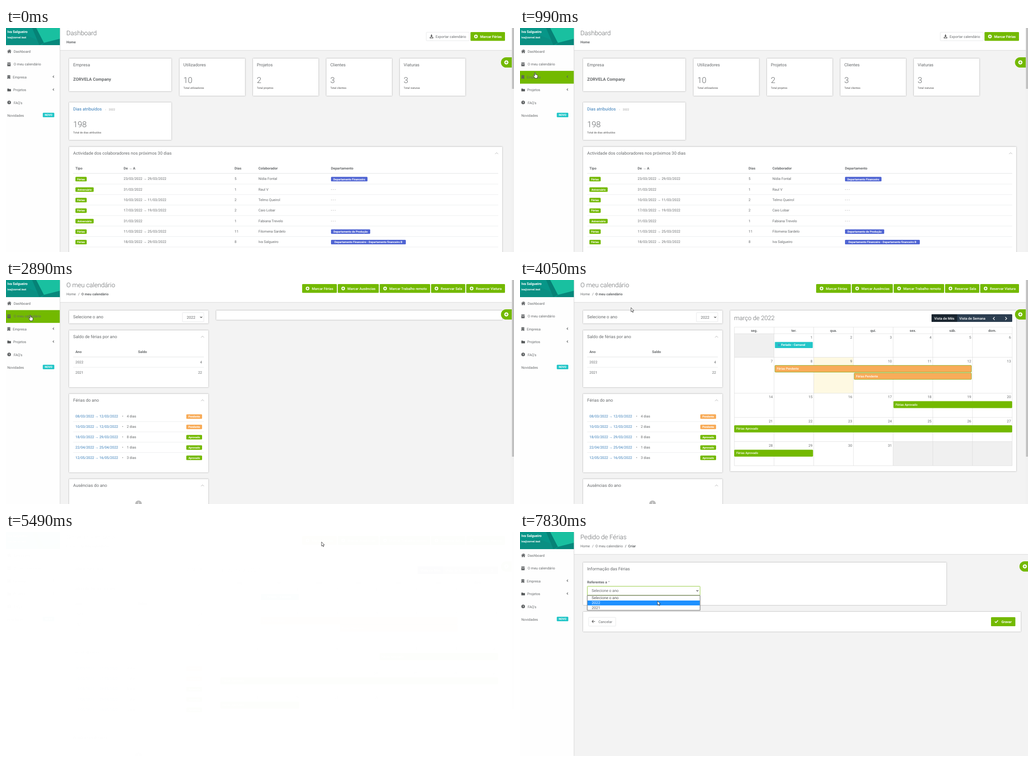
Write an HTML page that moves like this. It is 1127x497 px and loops after 8 s.

```html
<!DOCTYPE html>
<html lang="pt">
<head>
<meta charset="utf-8">
<title>Calendário</title>
<style>
html, body { margin: 0; width: 100%; height: 100%; overflow: hidden; background: #f3f3f3; }
svg { display: block; width: 100vw; height: 100vh; }
text { font-family: Roboto, Arial, sans-serif; text-rendering: geometricPrecision; white-space: pre; }
.card { filter: drop-shadow(0 .9px .8px rgba(0,0,0,.42)); }
.bar { filter: drop-shadow(0 .5px 1px rgba(0,0,0,.25)); }
</style>
</head>
<body>
<svg id="stage" viewBox="0 0 1127 497" preserveAspectRatio="none"></svg>
<script>
const GREEN = '#73b900', GREY = '#676a6c', BLUE = '#337ab7', CYAN = '#23c6c8',
      ORANGE = '#f8ac59', INDIGO = '#5065d3', LINE = '#e4e5e7';
const USER = 'Iva Salgueiro';

// Markup helpers
const rect = (x, y, w, h, fill, more = '') =>
  `<rect x="${x}" y="${y}" width="${w}" height="${h}" fill="${fill}" ${more}/>`;
const text = (x, y, s, size = 7.8, fill = GREY, weight = 400, anchor = 'start') =>
  `<text x="${x}" y="${y}" font-size="${size}" fill="${fill}" font-weight="${weight}" text-anchor="${anchor}">${s}</text>`;
const bold = (x, y, s, size = 7.75) => text(x, y, s, size, GREY, 700);
const path = (d, fill, more = '') => `<path d="${d}" fill="${fill}" ${more}/>`;
const stroke = (d, color, width = 1) => path(d, 'none', `stroke="${color}" stroke-width="${width}"`);
const group = (id, body, more = '') => `<g id="${id}" ${more}>${body}</g>`;
const card = (x, y, w, h) => rect(x, y, w, h, '#fff', 'class="card"');
const rule = (x1, x2, y, color = LINE) => stroke(`M${x1} ${y}H${x2}`, color, .7);
const title = (x, y, s, fill = GREY) => text(x, y, s, 9.5, fill);
const fold = (x, y) => stroke(`M${x - 3.2} ${y + 1.6}l3.2 -3.2l3.2 3.2`, '#b0b0b0', 1);
const drop = (x, y) => stroke(`M${x - 2.2} ${y - 1.1}l2.2 2.3l2.2 -2.3`, '#444', 1.2);
const badge = (x, y, w, s, fill, size = 6.2) =>
  rect(x, y - 5, w, 10, fill, 'rx="1.6"') + text(x + w / 2, y + 2.2, s, size, '#fff', 700, 'middle');
const plus = (x, y, color, r = 4) =>
  `<circle cx="${x}" cy="${y}" r="${r}" fill="#fff"/>` +
  stroke(`M${x - r * .55} ${y}h${r * 1.1}M${x} ${y - r * .55}v${r * 1.1}`, color, 1.3);
const button = (x, w, s, weight = 500, id = '') =>
  rect(x, 9, w, 19.4, GREEN, `rx="1.5" ${id}`) + plus(x + 12, 18.8, GREEN) +
  text(x + 21.6, 21.6, s, 7.7, '#fff', weight);
const outline = (x, y, w, h, id = '') =>
  rect(x + .4, y + .4, w, h, '#fff', `stroke="#e1e3e5" stroke-width=".8" rx="1" ${id}`);
const tab = x => path(`M1127 65H${x + 11.5}a11.4 11.4 0 0 0 0 22.8H${Math.min(1127, x + 24)}V65z`, GREEN) +
  plus(x + 12, 76.3, GREEN, 4.6);
const plusTab = x => `<svg x="0" y="0" width="${x + 24}" height="497">${tab(x)}</svg>`;
const scrollbar = h => rect(1122, 0, 5, 497, '#f1f1f1') + rect(1122.5, 0, 4.5, h, '#c1c1c1');
const header = (w, name) => rect(119.5, 0, w, 49, '#fff', 'class="bar"') + text(134, 16, name, 14.1, GREY, 300);

// Sidebar
const ITEM_Y = i => 38.4 + 28.35 * i;
function sidebar() {
  const ink = '#585b5d';
  const items = [[17, 'Dashboard'], [17, 'O meu calendário'], [15, 'Empresa'], [16, 'Projetos'], [17, "FAQ's"], [3, 'Novidades']];
  return rect(0, 0, 119.3, 497, '#fefefe', 'class="bar"') +
    rect(0, 0, 119.3, 38, '#079688') +
    path('M0 28L40 14L84 33L74 38H0z', '#0a8f82') +
    path('M67 0L84 33L119.3 24V0z', '#19c0a0') +
    path('M84 33L119.3 24V38H80z', '#07877b') +
    path('M67 0L84 33L74 38L58 0z', '#068276') +
    text(3, 11, USER, 7.7, '#fff', 700) + text(3, 23, 'iva@zorvel.test', 6, '#fff', 700) +
    rect(0, 0, 119.3, 28.4, GREEN, 'id="hover" opacity="0"') +
    items.map(([x, s], i) => text(x, 55 + 28.4 * i, s)).join('') +
    path('M7.2 47.6L2.6 51.6l.7 .7l3.9 -3.4l3.9 3.4l.7 -.7l-1.5 -1.3v-2h-1.2v1zM4 52.2v3.6h2.4v-2.5h1.6v2.5h2.4v-3.6l-3.2 -2.8z', ink) +
    path('M3 78.2h7.2v-1.5h-1.3v-1h-1v1h-2.6v-1h-1v1h-1.3zM3 79h7.2v5.7h-7.2zM4.4 80.6h4.4v.9h-4.4z', ink, 'fill-rule="evenodd"') +
    path('M3.2 104.7h6.2v8h-2.3v-1.8h-1.6v1.8h-2.3zM4.5 106h1v1h-1zM7.1 106h1v1h-1zM4.5 108.2h1v1h-1zM7.1 108.2h1v1h-1z', ink, 'fill-rule="evenodd"') +
    path('M3 134.4h3l1 1h4v5h-8z', ink) +
    `<circle cx="7" cy="165.2" r="3.9" fill="${ink}"/>` + text(7, 167.5, '?', 6.4, '#fff', 700, 'middle') +
    [108, 136.6].map(y => stroke(`M106.4 ${y - 2.3}l-2.3 2.3l2.3 2.3`, ink, 1.1)).join('') +
    badge(81.6, 193, 25.6, 'NOVO', CYAN);
}

// Dashboard page
const ROW_Y = i => 323 + 23.28 * i;
function dashboard() {
  const counts = [['Utilizadores', 10], ['Projetos', 2], ['Clientes', 3], ['Viaturas', 3]];
  const rows = [
    ['23/03/2022 → 29/03/2022', 5, 'Nídia Fontal', 'Departamento Financeiro', 81],
    ['31/03/2022', 1, 'Raul V'],
    ['10/03/2022 → 11/03/2022', 2, 'Telmo Queirol'],
    ['17/03/2022 → 19/03/2022', 2, 'Caio Lobar'],
    ['31/03/2022', 1, 'Fabiana Trevelo'],
    ['11/03/2022 → 25/03/2022', 11, 'Filomena Sardelo', 'Departamento de Produção', 87],
    ['18/03/2022 → 29/03/2022', 8, USER, 'Departamento Financeiro - Departamento financeiro B', 166]];
  let s = header(1003, 'Dashboard') + bold(134, 34, 'Home') +
    outline(932, 9, 95.5, 18.8) + text(953, 21.6, 'Exportar calendário') +
    path('M943 14.5h2v3h2l-3 3l-3 -3h2zM940 20.5h2l2 1.6l2 -1.6h2v2.3h-8z', '#555') +
    button(1030.5, 76.5, 'Marcar Férias', 700) +
    card(140, 67.5, 227, 73) + title(149, 85, 'Empresa') + bold(149, 117.4, 'ZORVELA Company', 9.5);
  counts.forEach(([name, n], i) => {
    const x = 385 + 162.9 * i;
    s += card(x, 67.5, 145.5, 83) + title(x + 8.6, 85, name) + text(x + 8.6, 122.4, n, 18, GREY, 300) +
      text(x + 8.6, 135.2, 'Total ' + name.toLowerCase(), 6, '#555');
  });
  s += card(140, 165, 227, 83.5) + title(149, 183, 'Dias atribuídos', BLUE) + text(220, 183, '-', 6) +
    text(228, 183, '2022', 6.2, '#999') + text(149, 220.4, '198', 18, GREY, 300) +
    text(149, 233.8, 'Total de dias atribuídos', 6, '#555') +
    card(140, 263.5, 961, 260) + title(149, 281.3, 'Actividade dos colaboradores nos próximos 30 dias') + fold(1088.5, 278) +
    rect(149, 0, 943, 23, '#f5f5f5', 'id="row" opacity="0"');
  [[154, 'Tipo'], [261, 'De → A'], [507, 'Dias'], [560, 'Colaborador'], [721, 'Departamento']]
    .forEach(([x, h]) => s += bold(x, 314.3, h));
  s += rule(149, 1092, 322.6, '#d5d7d9');
  rows.forEach(([dates, days, who, dept, w], i) => {
    const y = ROW_Y(i) + 12, birthday = dates.length < 12;
    s += badge(154, y + .3, birthday ? 40.5 : 25, birthday ? 'Aniversário' : 'Férias', GREEN) +
      text(261, y + 2.4, dates) + text(507, y + 2.4, days) + text(560, y + 2.4, who) +
      (dept ? badge(721, y + .3, w, dept, INDIGO) : text(721, y + 2.4, '- - -', 7.8, '#888')) +
      rule(149, 1092, ROW_Y(i + 1));
  });
  return s + scrollbar(135) + plusTab(1098);
}

// Calendar page
function month() {
  const X = i => 475.5 + 88.05 * i, Y = [119.2, 171.5, 251.2, 305, 358.5, 412];
  const ev = (x, y, w, h, s, fill, edge) =>
    rect(x, y, w, h, fill, `rx="1.2" stroke="${edge}" stroke-width=".9"`) + text(x + 4.2, y + h / 2 + 2.1, s, 6.7, '#fff', 500);
  let s = text(475, 89, 'março de 2022', 13.6, GREY, 300) +
    rect(913, 76, 179, 17, '#2c3e50', 'rx="1.5"') + rect(913, 76, 57, 17, '#1a252f', 'rx="1.5"') +
    text(919, 88, 'Vista de Mês', 7.7, '#fff', 500) + text(974.5, 88, 'Vista de Semana', 7.7, '#fff', 500) +
    stroke('M1053 82.2l-3.2 3.2l3.2 3.2M1076.6 82.2l3.2 3.2l-3.2 3.2', '#fff', 1.3) +
    rect(X(0), Y[0], 88, 52.3, '#f0f0f0') + rect(X(4), Y[4], 264.2, 53.5, '#f0f0f0') +
    rect(X(2), Y[1], 88, 79.7, '#fef9e2') + rule(X(0), X(7), 104.5, '#ddd');
  Y.forEach(y => s += rule(X(0), X(7), y, '#d8d8d8'));
  for (let i = 0; i < 8; i++) s += stroke(`M${X(i)} 104.5V412`, '#d8d8d8', .7);
  ['seg.', 'ter.', 'qua.', 'qui.', 'sex.', 'sáb.', 'dom.'].forEach((d, i) =>
    s += text(X(i) + 44, 114.6, d, 7.7, GREY, 700, 'middle'));
  for (let d = 1; d < 32; d++)
    s += text(X(d % 7 + 1) - 2.8, Y[Math.floor(d / 7)] + 11.2, d, 7.8, GREY, 400, 'end');
  return s + rect(565.5, 137.5, 84, 13.4, CYAN, 'rx="1"') + '<circle cx="574.5" cy="144.2" r="2.5" fill="#3a98c8"/>' +
    text(579.5, 146.4, 'Feriado - Carnaval', 6.5, '#fff', 700) +
    ev(565.7, 189.4, 435.8, 15, 'Férias Pendente', ORANGE, '#7fae1c') +
    ev(741.4, 206.2, 260.1, 14.4, 'Férias Pendente', ORANGE, '#7fae1c') +
    ev(829, 269.2, 262.4, 14.6, 'Férias Aprovado', GREEN, GREEN) +
    ev(475.7, 322.8, 615.7, 15, 'Férias Aprovado', GREEN, GREEN) +
    ev(475.7, 377, 174, 14.4, 'Férias Aprovado', GREEN, GREEN);
}
function calendar() {
  const leave = [['08/03/2022 → 12/03/2022', 4], ['10/03/2022 → 12/03/2022', 2], ['18/03/2022 → 29/03/2022', 8],
    ['22/04/2022 → 25/04/2022', 1], ['12/05/2022 → 16/05/2022', 3]];
  let s = card(140, 67.5, 309, 29) + title(149, 85, 'Selecione o ano') +
    outline(391, 72, 47.5, 20.4) + text(401, 85.5, '2022', 8.5) + drop(433, 82.5) +
    card(140, 111.5, 309, 126.5) + title(149, 129.4, 'Saldo de férias por ano') + fold(436, 126) +
    bold(154, 162.2, 'Ano') + bold(293, 162.2, 'Saldo') + rule(149, 439, 170.8, '#d5d7d9') +
    text(154, 185.4, '2022') + text(435, 185.4, '4', 7.8, GREY, 400, 'end') + rule(149, 439, 193.8) +
    text(154, 208.2, '2021') + text(435, 208.2, '22', 7.8, GREY, 400, 'end') +
    card(140, 252.5, 309, 174.5) + title(149, 270.4, 'Férias do ano') + fold(436, 267);
  leave.forEach(([dates, n], i) => {
    const y = 302.6 + 22.9 * i;
    s += text(154, y + 2.5, dates, 7.8, BLUE) + text(257.4, y + 2.5, '•', 7.8) + text(268, y + 2.5, n + ' dias') +
      badge(400, y + .4, 35, i < 2 ? 'Pendente' : 'Aprovado', i < 2 ? ORANGE : GREEN, 6) +
      (i < 4 ? rule(149, 439, y + 11.5) : '');
  });
  s += card(140, 441.5, 309, 80) + title(149, 459.3, 'Ausências do ano') + fold(436, 456) +
    '<circle cx="294" cy="496.4" r="7.2" fill="#bbb"/>' + text(294, 498, 'i', 8, '#fff', 700, 'middle') +
    rect(466.3, 67.5, 634.7, 21, '#fff', 'class="card" id="panel"') + group('month', month());
  const buttons = [[736, 91, 'Marcar Ausências'], [829, 112, 'Marcar Trabalho remoto'], [943, 76, 'Reservar Sala'], [1021, 86, 'Reservar Viatura']];
  return header(1003, 'O meu calendário') + text(134, 34, 'Home') + text(160, 34, '/') + bold(167.3, 34, 'O meu calendário', 7.65) +
    button(657, 77, 'Marcar Férias', 500, 'id="book"') + buttons.map(b => button(...b)).join('') +
    group('calCards', s) + scrollbar(392) + plusTab(1098);
}

// Request form page
function form() {
  const cards = card(140, 67.5, 806, 94.5) + title(149, 85, 'Informação das Férias') +
    bold(149, 113.8, 'Referentes a') + text(196, 112.5, '*', 6) +
    card(140, 177, 971, 44) + outline(152, 189, 60, 19.4) + text(174, 201.5, 'Cancelar') +
    stroke('M166.5 198.5h-6.5M162.8 195.5l-3 3l3 3', '#555', 1.1) +
    rect(1045, 189, 54, 20, GREEN, 'rx="1.5"') + stroke('M1053.5 198.6l2.4 2.4l4.6 -5', '#fff', 1.6) +
    text(1068, 201.6, 'Gravar', 7.7, '#fff', 700) +
    outline(149, 120, 250, 20, 'id="select"') + text(159, 133.4, 'Selecione o ano', 8.5) + drop(393.5, 130.2) + plusTab(1108);
  const list = rect(149.4, 141, 249.8, 32.6, '#fff', 'stroke="#777" stroke-width=".9" class="card"') +
    rect(149.8, 141.3, 249, 10.8, '#1e90ff', 'id="pick"') +
    ['Selecione o ano', '2022', '2021'].map((s, i) => `<g id="opt${i}">${text(159, 149.4 + 10.75 * i, s, 8.5, 'currentColor')}</g>`).join('');
  return header(1008, 'Pedido de Férias') + text(134, 34, 'Home') + text(160, 34, '/') +
    text(167.3, 34, 'O meu calendário') + bold(233, 34, '/') + bold(240, 34, 'Criar') +
    group('formCards', cards) + group('list', list);
}

const arrow = path('M0 0V9.3L2.1 7.3L3.6 10.7L5.1 10L3.6 6.8H6.5z', '#fff', 'stroke="#222" stroke-width=".8"');
const hand = path('M-1 1C-1 -.3 .9 -.3 .9 1V4.6C1.6 4 2.6 4.3 2.7 5C3.4 4.5 4.3 4.9 4.4 5.6C5.2 5.3 5.8 5.8 5.8 6.6V9C5.8 10.4 4.8 11 4.8 12.6H-.6C-.6 11 -2.4 9.6 -3.8 7.2C-4.2 6.2 -3 5.6 -2.2 6.4L-1 7.6z',
  '#fff', 'stroke="#222" stroke-width=".9"');

document.getElementById('stage').innerHTML =
  rect(0, 0, 1127, 497, '#f3f3f3') + group('dash', dashboard()) + group('cal', calendar()) + group('form', form()) +
  sidebar() + rect(0, 0, 1127, 497, '#fff', 'id="veil"') +
  group('cursor', group('arrow', arrow) + group('hand', hand));

const $ = id => document.getElementById(id);
const set = (id, name, value) => $(id).setAttribute(name, value);
const show = (id, on) => set(id, 'display', on ? 'inline' : 'none');

// Pointer moves: start, end, steps, target x, target y, ease-out power
const moves = [
  [120, 840, 10, 32, 84, 3], [990, 1160, 3, 34, 105, 3], [1540, 1620, 2, 35, 80, 2], [2320, 2480, 3, 54, 78, 2],
  [4050, 4700, 9, 700, 22, 3], [6430, 7060, 9, 310, 137, 4.4], [7210, 7210, 1, 313, 142, 1], [7530, 7830, 5, 305, 153, 1.5]];

function steps(t, a, b, n) {
  if (t < a) return 0;
  if (t >= b) return 1;
  return (Math.floor((t - a) / (b - a) * (n - 1) + 1e-6) + 1) / n;
}
function pointer(t) {
  let x = 420, y = 610;
  for (const [a, b, n, tx, ty, pow] of moves) {
    const q = 1 - Math.pow(1 - steps(t, a, b, n), pow);
    x += (tx - x) * q;
    y += (ty - y) * q;
  }
  return [x, y];
}

function draw(t) {
  const [x, y] = pointer(t);
  const onDash = t < 2560, onForm = t >= 5580, onCal = !onDash && !onForm;
  show('dash', onDash);
  show('cal', onCal);
  show('form', onForm);

  const item = Math.floor((y - ITEM_Y(0)) / 28.35);
  const inMenu = x < 119 && item >= 0 && item < 6 && t >= 120;
  set('hover', 'opacity', inMenu ? 1 : 0);
  if (inMenu) set('hover', 'y', ITEM_Y(item));

  const row = Math.floor((y - ROW_Y(0)) / 23.28);
  const inRow = onDash && t >= 120 && x > 149 && row >= 0 && row < 7;
  set('row', 'opacity', inRow ? 1 : 0);
  if (inRow) set('row', 'y', ROW_Y(row) + .3);

  const enter = steps(t, 2640, 2890, 4);
  set('calCards', 'opacity', enter);
  set('calCards', 'transform', `translate(${24 * (1 - enter)} 0)`);
  set('panel', 'height', t < 3040 ? 21 : 357);
  show('month', t >= 3040);

  const onBook = onCal && x > 657 && x < 734 && y > 9 && y < 29;
  const press = steps(t, 4870, 5030, 3);
  set('book', 'fill', onBook ? `rgb(${160 - 24 * press},${246 - 34 * press},${30 - 18 * press})` : GREEN);

  show('formCards', t >= 5740);
  const open = t >= 6980, pick = t < 7600 ? 0 : 1;
  show('list', open);
  set('select', 'stroke', open ? GREEN : '#e1e3e5');
  set('pick', 'y', 141.3 + 10.75 * pick);
  for (let i = 0; i < 3; i++) set('opt' + i, 'color', i === pick ? '#fff' : '#555');

  set('veil', 'opacity', t < 5420 || onForm ? 0 : t < 5490 ? .6 : .99);
  const pointing = t < 5420 && (inMenu || onBook);
  show('cursor', t >= 120);
  show('hand', pointing);
  show('arrow', !pointing);
  set('cursor', 'transform', `translate(${x} ${y})`);
}

const start = performance.now();
function tick() {
  draw((performance.now() - start) % 8000);
  requestAnimationFrame(tick);
}
tick();
</script>
</body>
</html>
```
